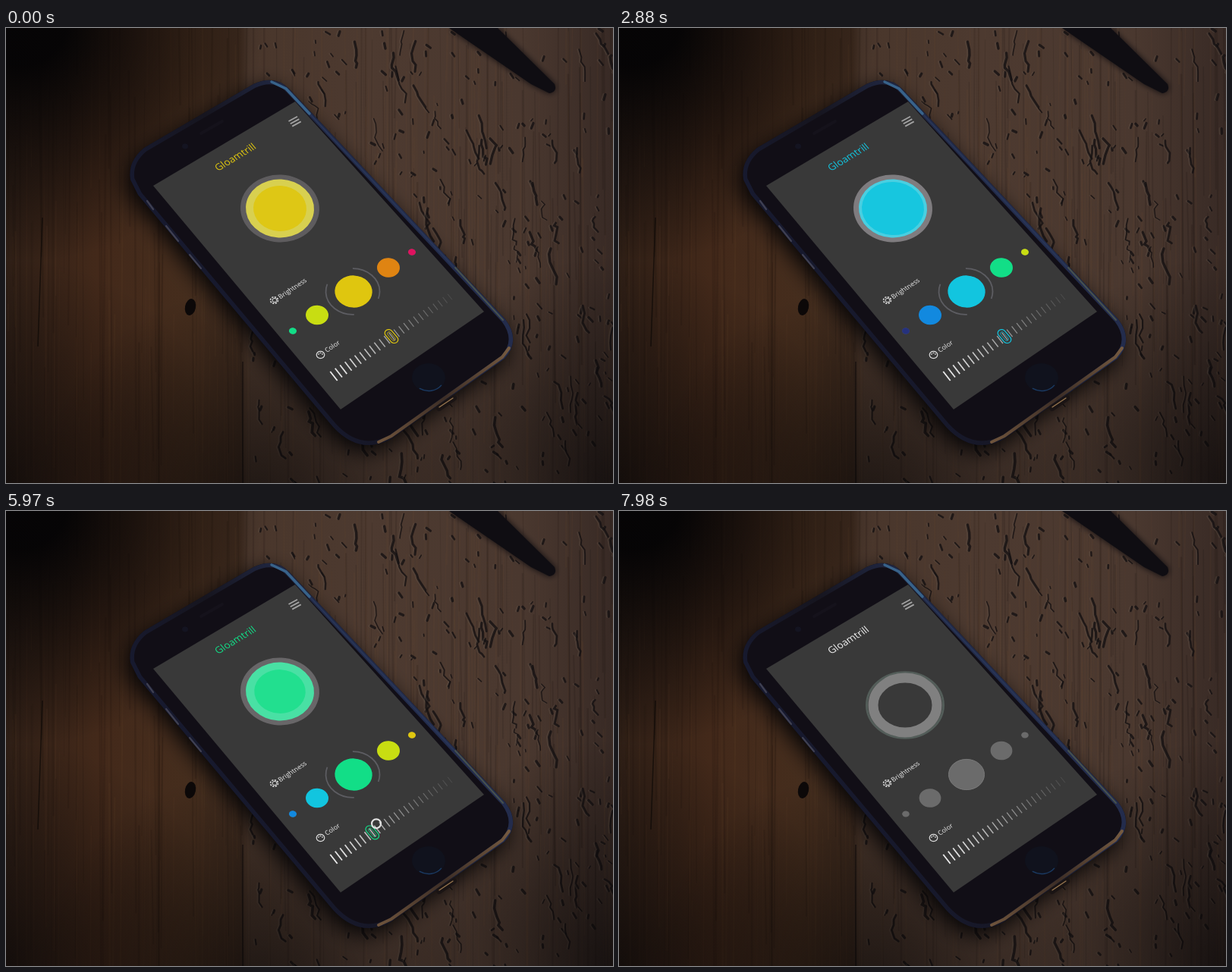
These frames come from a looping animation (800 px wide and 600 px high, 8 s). An HTML page with a canvas:

```html
<!DOCTYPE html>
<html lang="en">
<head>
<meta charset="utf-8">
<title>Gloamtrill</title>
<style>
  html, body { margin: 0; width: 100%; height: 100%; overflow: hidden; background: #120c09; }
  canvas { display: block; width: 800px; height: 600px; }
</style>
</head>
<body>
<canvas id="stage" width="800" height="600"></canvas>
<script>
const LOOP = 8000, TAU = Math.PI * 2, SQUASH = 0.855;
const canvas = document.getElementById('stage');
let ctx = canvas.getContext('2d');

// Palette, starting two places before the first selected colour
const PALETTE = [[223,18,95], [223,132,18], [223,198,15], [200,221,18],
                 [18,222,135], [18,197,223], [18,137,223], [38,50,125]];
const SLOTS = [[378,399.5,0], [378,399.5,5], [410,378.5,15], [458,347.5,24.7],
               [504,316,15], [535,295.5,5], [535,295.5,0]];

// Keys are [time, value]; values ease smoothly from one key to the next
const SELECT = [[350,0], [900,1], [1240,1], [1720,2], [1900,2], [2400,3], [3550,3], [4050,2]];
const SLIDER = [[4400,508], [5000,566], [5180,566], [5700,476], [5780,476], [6350,502]];
const PULSE = [[0,35], [1500,31], [3360,43], [5200,32], [6870,36]];
const HALO = [[0,.33], [1500,.36], [2700,.62], [3900,.6], [5200,.45], [6870,.36]];
const VEIL = [[5700,.03], [6400,.2]];
const SWIPES = [[350,900], [1240,1720], [1900,2400], [3550,4050]];

const clamp = x => Math.max(0, Math.min(1, x));
const lerp = (a, b, k) => a + (b - a) * k;
const mix = (a, b, k) => a.map((v, i) => lerp(v, b[i], k));
const rgba = (c, a = 1) => `rgba(${c.map(Math.round)},${a})`;

function track(keys, t) {
  if (t <= keys[0][0]) return keys[0][1];
  for (let i = 1; i < keys.length; i++) {
    const [t0, v0] = keys[i - 1], [t1, v1] = keys[i];
    if (t < t1) {
      const k = (t - t0) / (t1 - t0);
      return lerp(v0, v1, k * k * (3 - 2 * k));
    }
  }
  return keys[keys.length - 1][1];
}

function window01(t, start, end, fade = 90) {
  return clamp(Math.min((t - start) / fade, (end - t) / fade));
}

function oval(x, y, r, fill) {
  if (r <= 0) return;
  ctx.fillStyle = fill;
  ctx.beginPath();
  ctx.ellipse(x, y, r, r * SQUASH, 0.05, 0, TAU);
  ctx.fill();
}

function ring(x, y, r, color, width, from = 0, to = TAU) {
  ctx.strokeStyle = color;
  ctx.lineWidth = width;
  ctx.beginPath();
  ctx.ellipse(x, y, r, r * SQUASH, 0, from, to);
  ctx.stroke();
}

function line(points, color, width) {
  ctx.strokeStyle = color;
  ctx.lineWidth = width;
  ctx.beginPath();
  points.forEach(([x, y]) => ctx.lineTo(x, y));
  ctx.stroke();
}

// Runs draw in the tilted plane of the display
function onPlane(x, y, draw, slope = 0.6) {
  ctx.save();
  ctx.translate(x, y);
  const n = Math.hypot(1, slope);
  ctx.transform(1 / n, -slope / n, 0.643, 0.765, 0, 0);
  draw();
  ctx.restore();
}

function label(text, x, y, size, color, slope) {
  onPlane(x, y, () => {
    ctx.font = `${size}px "Open Sans", sans-serif`;
    ctx.fillStyle = color;
    ctx.fillText(text, 0, 0);
  }, slope);
}

function seeded(seed) {
  return () => (seed = (seed * 16807) % 2147483647) / 2147483647;
}

function drawTable() {
  const wood = ctx.createLinearGradient(0, 0, 800, 0);
  [[0,'#2f1f16'], [.15,'#43291a'], [.3,'#452d1d'], [.385,'#3c291d'], [.4,'#49362b'],
   [.6,'#4d3a30'], [.85,'#4a382f'], [1,'#382a25']].forEach(s => wood.addColorStop(...s));
  ctx.fillStyle = wood;
  ctx.fillRect(0, 0, 800, 600);

  const rand = seeded(71);
  for (let i = 0; i < 330; i++) {
    const x = rand() * 800, y = rand() * 600 - 150, len = 120 + rand() * 350;
    const tone = rand() < .5 ? 'rgba(8,5,5,.12)' : 'rgba(120,80,52,.1)';
    line([[x, y], [x + rand() * 8 - 4, y + len]], tone, .6 + rand() * 2);
  }
  // Weathered cracks on the right-hand board, each with a worn, lighter lip
  ctx.lineCap = 'round';
  for (let i = 0; i < 430; i++) {
    let x = 320 + rand() * 480, y = rand() * 600;
    const long = rand() < .22, points = [[x, y]], width = 1.4 + rand() * 2.2;
    for (let k = long ? 5 : 1; k--;) {
      x += rand() * 9 - 3;
      y += 2 + rand() * (long ? 10 : 5);
      points.push([x, y]);
    }
    line(points.map(([px, py]) => [px - 2, py]), 'rgba(105,88,78,.28)', width);
    line(points, 'rgba(20,16,18,.8)', width);
  }
  ctx.lineCap = 'butt';
  line([[312, 440], [312, 600]], 'rgba(12,8,7,.5)', 2);
  line([[48, 250], [42, 420]], 'rgba(8,5,4,.6)', 1.5);
  ctx.fillStyle = '#0c0808';
  ctx.beginPath();
  ctx.ellipse(243, 368, 7, 11, .2, 0, TAU);
  ctx.fill();

  const shade = (x, y, inner, outer, alpha) => {
    const g = ctx.createRadialGradient(x, y, inner, x, y, outer);
    g.addColorStop(0, `rgba(5,4,5,${alpha})`);
    g.addColorStop(1, 'rgba(5,4,5,0)');
    ctx.fillStyle = g;
    ctx.fillRect(0, 0, 800, 600);
  };
  shade(20, -10, 60, 320, .98);
  shade(0, 600, 0, 300, .65);
  shade(800, 600, 0, 300, .65);
  shade(330, 640, 0, 300, .65);

  ctx.save();
  ctx.shadowColor = '#0b090d';
  ctx.shadowBlur = 8;
  ctx.fillStyle = '#0f0d12';
  ctx.fill(new Path2D('M584 0H648L723 74Q727 84 716 86L692 74Z'));
  ctx.restore();
}

function drawPhone() {
  const body = new Path2D('M164 200Q160 176 182 158L326 74Q354 61 373 80L658 384Q679 412 657 436L506 543Q465 563 431 526L174 220Z');
  ctx.save();
  ctx.shadowColor = '#050405';
  ctx.shadowBlur = 28;
  ctx.shadowOffsetX = -5;
  ctx.shadowOffsetY = 9;
  ctx.fillStyle = '#110e16';
  ctx.fill(body);
  ctx.restore();
  ctx.save();
  ctx.clip(body);
  // The rim brightens from the left flank to the right one
  const edge = ctx.createLinearGradient(270, 370, 500, 210);
  edge.addColorStop(0, '#171a30');
  edge.addColorStop(.5, '#16151f');
  edge.addColorStop(1, '#232c4c');
  ctx.strokeStyle = edge;
  ctx.lineWidth = 11;
  ctx.stroke(body);
  ctx.restore();

  ctx.lineCap = 'round';
  line([[350, 71], [369, 80], [400, 113]], '#38638a', 3.5);
  line([[402, 115], [430, 145], [590, 315]], '#283556', 2);
  line([[592, 316], [655, 385]], '#46514f', 2);
  const rim = ctx.createLinearGradient(490, 547, 664, 425);
  rim.addColorStop(0, '#6f543c');
  rim.addColorStop(.5, '#3d2e26');
  rim.addColorStop(1, '#755a40');
  line([[491, 546], [508, 538], [654, 434], [663, 422]], rim, 4);
  line([[571, 501], [590, 488]], '#1a1414', 8);
  line([[571, 500], [589, 488]], '#9a7850', 1.3);
  [[186,228,194,239], [211,261,227,281], [242,299,257,317]].forEach(([a, b, c, d]) =>
    line([[a, b], [c, d]], '#3f4052', 2.2));
  line([[257, 139], [285, 123]], '#15121b', 4);
  oval(236, 156, 4, '#141421');
  ctx.lineCap = 'butt';

  oval(557, 461, 22, '#10121d');
  ring(557, 461, 20.5, '#1b3a62', 1.5, .6, 2.2);
}

function drawDisplay() {
  ctx.fillStyle = '#393939';
  ctx.fill(new Path2D('M194 208L381 97L630 374L441 503Z'));
  [[372.5,123], [374.8,126.3], [377.2,129.6]].forEach(([x, y]) =>
    line([[x, y], [x + 11.5, y - 6.2]], '#a2a2a2', 1.8));

  label('Brightness', 361.5, 357.5, 8.6, '#eee', .66);
  label('Color', 423, 428, 8.6, '#eee', .66);
  ctx.setLineDash([2.2, 1.4]);
  ring(353.5, 359, 5, '#ddd', 1.6);
  ctx.setLineDash([]);
  ring(354, 359, 3, '#ddd', 1);
  ring(414.5, 431, 5.3, '#ddd', 1.2);
  [[412,430], [414.5,428.5], [417,430]].forEach(([x, y]) => oval(x, y, 1, '#ddd'));

  for (let i = 0; i < 25; i++) {
    const k = i / 24, x = 432 + 153 * k, y = 459 - 104.5 * k, h = lerp(1, .62, k);
    const shade = Math.round(lerp(235, 110, k));
    line([[x - 4.7 * h, y - 6 * h], [x + 4.7 * h, y + 6 * h]],
         rgba([shade, shade, shade], lerp(1, .4, k * k)), lerp(1.8, 1, k));
  }
  SLOTS.forEach(([x, y, r]) => oval(x, y, r * .96, '#6b6b6b'));
  ring(458, 347.5, 23.5, '#777', 1);
}

function slotAt(s) {
  const p = Math.max(0, Math.min(6, s + 3)), i = Math.min(5, Math.floor(p));
  return mix(SLOTS[i], SLOTS[i + 1], p - i);
}

// Liquid tail from a moving bubble back to the place it left
function tail([x, y, r], [x0, y0, r0], stretch, color) {
  const dx = x0 - x, dy = y0 - y, d = Math.hypot(dx, dy);
  if (d < 1 || stretch <= 0) return;
  const nx = -dy / d, ny = dx / d, end = Math.min(r, r0) * .5 * stretch, a = r * .85;
  const mx = x + dx * .6, my = y + dy * .6, pinch = end * .8;
  ctx.fillStyle = color;
  ctx.beginPath();
  ctx.moveTo(x + nx * a, y + ny * a);
  ctx.quadraticCurveTo(mx + nx * pinch, my + ny * pinch, x0 + nx * end, y0 + ny * end);
  ctx.lineTo(x0 - nx * end, y0 - ny * end);
  ctx.quadraticCurveTo(mx - nx * pinch, my - ny * pinch, x - nx * a, y - ny * a);
  ctx.fill();
  oval(x0, y0, end, color);
}

function drawBubbles(p, heading, off) {
  const from = heading < 0 ? Math.ceil(p) : Math.floor(p);
  const stretch = 1 - Math.abs(p - from) / (heading < 0 ? .95 : .5);
  PALETTE.forEach((color, n) => {
    const i = n - 2, spot = slotAt(p - i), fill = rgba(color, 1 - off);
    spot[2] *= 1 - off;
    if (spot[2] < .2) return;
    if (heading) tail(spot, slotAt(from - i), stretch, fill);
    oval(...spot, fill);
  });
  const turn = -Math.sin(Math.PI * (p - Math.floor(p))) * .53, arc = `rgba(190,190,205,${.27 * (1 - off)})`;
  ring(457, 347.5, 35.5, arc, 1.8, 1.52 + turn, 3.47 + turn);
  ring(457, 347.5, 35.5, arc, 1.8, 4.71 + turn, 6.6 + turn);
}

function drawDial(t, color, knobX, off) {
  const x = lerp(361, 377, off), y = lerp(238, 256, off), on = 1 - off;
  const dim = clamp((knobX - 510) / 56), grey = [126, 119, 119], pale = [200, 230, 230];
  const light = mix(mix(color, pale, .3), [142, 170, 155], dim * .8);
  oval(x, y, 52, `rgba(170,165,170,${track(HALO, t) * on})`);
  ring(x, y, 50.5, `rgba(110,130,122,${.5 * off})`, 3);
  if (off) ring(x, y, 42, `rgba(128,128,128,${off})`, 13);
  oval(x, y, 45, rgba(light, on));
  oval(x, y, 39, rgba(grey, dim * on));
  oval(x, y, track(PULSE, t), rgba(mix(mix(color, pale, track(VEIL, t)), [86, 122, 106], dim), on));

  const burst = clamp((t - 6980) / 620);
  if (burst > 0 && burst < 1) {
    const spread = 1 - (1 - burst) ** 3;
    ring(lerp(361, 336, spread), lerp(238, 217, spread), lerp(52, 110, spread),
         rgba(color, .3 * (1 - burst)), 2);
  }
}

function drawKnob(x, color, off) {
  if (off >= 1) return;
  onPlane(x, 459 - .69 * (x - 432), () => {
    ctx.globalAlpha = 1 - off;
    ctx.strokeStyle = rgba(color);
    ctx.lineWidth = 1.2;
    ctx.beginPath();
    ctx.roundRect(-5, -10.5, 10, 21, 5);
    ctx.stroke();
    ctx.lineWidth = .7;
    ctx.beginPath();
    ctx.roundRect(-2.2, -7, 4.4, 14, 2.2);
    ctx.stroke();
  }, .68);
}

function drawTouch(x, y, alpha) {
  if (alpha <= 0) return;
  ctx.strokeStyle = `rgba(225,225,225,${alpha})`;
  ctx.lineWidth = 2.2;
  ctx.beginPath();
  ctx.arc(x, y, 6, 0, TAU);
  ctx.stroke();
}

const backdrop = document.createElement('canvas');
backdrop.width = 800;
backdrop.height = 600;
const stageCtx = ctx;
ctx = backdrop.getContext('2d');
drawTable();
drawPhone();
drawDisplay();
ctx = stageCtx;

const startTime = performance.now();

function frame(now) {
  const t = Math.max(0, now - startTime) % LOOP;
  const p = track(SELECT, t), off = track([[7330, 0], [7900, 1]], t);
  const heading = Math.sign(track(SELECT, t + 4) - track(SELECT, t - 4));
  const knobX = track(SLIDER, t);

  // The lamp colour trails behind the bubbles
  const base = heading < 0 ? Math.ceil(p) : Math.floor(p);
  const next = heading < 0 ? base - 1 : base + 1;
  const color = mix(PALETTE[base + 2], PALETTE[next + 2], Math.abs(p - base) ** 2.6);

  ctx.drawImage(backdrop, 0, 0);
  label('Gloamtrill', 279.5, 189, 13, rgba(mix(color, [240, 240, 240], off)), .6);
  drawDial(t, color, knobX, off);
  drawBubbles(p, heading, off);
  drawKnob(knobX, color, off);

  const swipe = Math.max(...SWIPES.map(([a, b]) => window01(t, a - 90, b + 20)));
  const sx = 426 + 15 * (p - Math.floor(p));
  drawTouch(sx, 389 - (sx - 434) * .66, swipe);
  const tx = track(SLIDER, t + 80);
  drawTouch(tx, 451 - .69 * (tx - 432), window01(t, 4270, 6400));
  drawTouch(361, 238, window01(t, 6900, 7200) * .8);
  requestAnimationFrame(frame);
}
requestAnimationFrame(frame);
</script>
</body>
</html>
```
